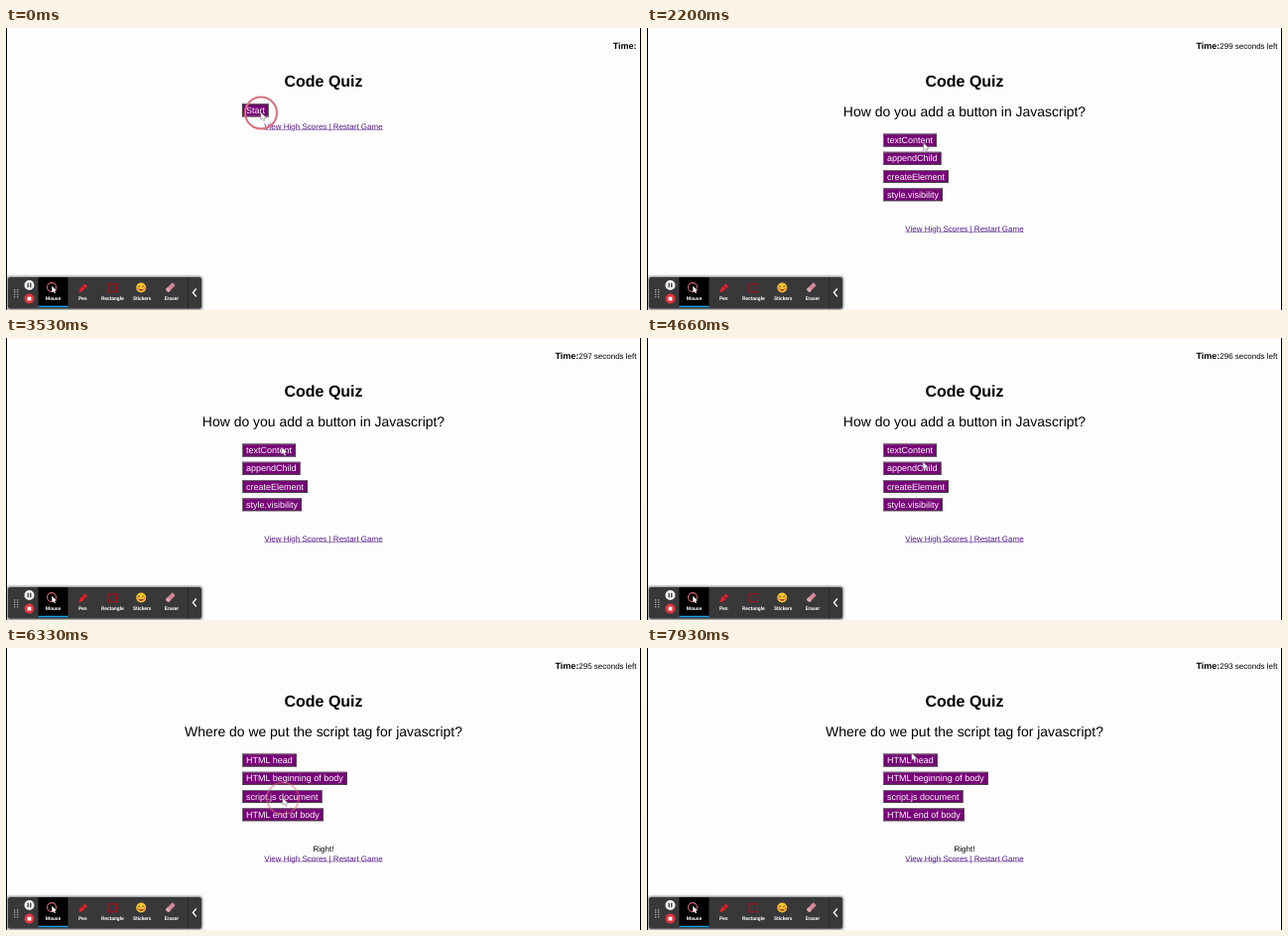
These frames come from a looping animation (640 px wide and 284 px high, 8 s). An HTML page:

```html
<!DOCTYPE html>
<html lang="en">
<head>
<meta charset="utf-8">
<title>Code Quiz</title>
<style>
@property --left { syntax: "<integer>"; inherits: true; initial-value: 299; }

html, body { margin: 0; width: 100%; height: 100%; overflow: hidden; background: #fdfdfd; }
body { font-family: "Liberation Sans", Arial, sans-serif; color: #000; }
/* laid out enlarged, then shrunk with a hair of rotation, so nothing snaps to whole pixels */
#stage {
  position: absolute; left: 0; top: 0; width: 640px; height: 284px; overflow: hidden;
  zoom: 4; transform: scale(.25) rotate(.002deg); transform-origin: 0 0;
  text-rendering: geometricPrecision;
}
#stage::after {
  content: ""; position: absolute; inset: 0;
  border: solid #000; border-width: 0 1px;
}

/* --y is the vertical centre of a line of text */
.line {
  position: absolute; left: 0; width: 640px; top: calc(var(--y) * 1px - 6px);
  text-align: center; font-size: 8px; line-height: 12px; white-space: pre;
}
.title { font-size: 16px; font-weight: bold; }
.question { font-size: 13.95px; }
.link { color: #551a8b; text-decoration: underline; text-decoration-thickness: .6px; }
.time { width: 635.5px; text-align: right; }
.time b { font-size: 9px; }
.button {
  position: absolute; left: 238px; top: calc(var(--y) * 1px);
  padding: 0 3px; font-size: 9px; line-height: 11px; white-space: pre;
  color: #fff; background: #780078;
  border: 1px solid; border-color: #6b6b6b #3c3c3c #3c3c3c #6b6b6b;
}
.pressed { border-color: #3c3c3c #6b6b6b #6b6b6b #3c3c3c; }
.count::after { counter-reset: left var(--left); content: counter(left); }

.scene, .time, .count, .cursor, .ring, .press { animation: 8s step-end infinite; }
.intro { animation-name: intro; }
.first { animation-name: first; }
.second { animation-name: second; }
.idle { animation-name: idle; }
.running { animation-name: running; }
.count { animation-name: countdown; }
.press { animation-name: press; }
.ring { animation-name: ring; animation-timing-function: linear; }
.cursor { animation-name: move; animation-timing-function: ease-in-out; }

@keyframes intro { 0% { visibility: visible } 5.75%, 100% { visibility: hidden } }
@keyframes first { 0% { visibility: hidden } 5.75% { visibility: visible } 78.75%, 100% { visibility: hidden } }
@keyframes second { 0% { visibility: hidden } 78.75%, 100% { visibility: visible } }
@keyframes idle { 0% { visibility: visible } 18.75%, 100% { visibility: hidden } }
@keyframes running { 0% { visibility: hidden } 18.75%, 100% { visibility: visible } }
@keyframes countdown {
  0% { --left: 299 } 31.25% { --left: 298 } 43.75% { --left: 297 } 56.25% { --left: 296 }
  68.75% { --left: 295 } 81.25% { --left: 294 } 93.75%, 100% { --left: 293 }
}
@keyframes press {
  0% { border-color: #6b6b6b #3c3c3c #3c3c3c #6b6b6b }
  77%, 100% { border-color: #3c3c3c #6b6b6b #6b6b6b #3c3c3c }
}
@keyframes ring {
  0%, 5% { opacity: 1 } 6%, 76.9% { opacity: 0 }
  77%, 78.75% { opacity: 1 } 79.5%, 100% { opacity: 0 }
}
@keyframes move {
  0%, 6% { transform: translate(256px, 84px) }
  13%, 16% { transform: translate(267px, 115px) }
  25%, 33% { transform: translate(278px, 115px) }
  44%, 52% { transform: translate(277px, 109px) }
  68%, 71.5% { transform: translate(278px, 156px) }
  76%, 88.5% { transform: translate(278px, 150px) }
  98.5%, 100% { transform: translate(266px, 105px) }
}

svg { position: absolute; left: 0; top: 0; }
.labels { font: bold 5px Roboto, "Open Sans", sans-serif; fill: #fff; text-anchor: middle; }
.shadow { filter: blur(1.3px); }
</style>
</head>
<body>
<div id="stage">
  <div class="line time idle" style="--y:18.2"><b>Time:</b></div>
  <div class="line time running" style="--y:18.2"><b>Time:</b><span class="count"></span> seconds left</div>
  <div class="line title" style="--y:53">Code Quiz</div>

  <div class="scene intro">
    <div class="button pressed" style="--y:76.5">Start</div>
    <div class="line" style="--y:99.2"><span class="link">View High Scores | Restart Game</span></div>
  </div>

  <div class="scene first">
    <div class="line question" style="--y:84">How do you add a button in Javascript?</div>
    <div class="button" style="--y:106.5">textContent</div>
    <div class="button" style="--y:124.75">appendChild</div>
    <div class="button press" style="--y:143">createElement</div>
    <div class="button" style="--y:161.25">style.visibility</div>
    <div class="line" style="--y:202.3"><span class="link">View High Scores | Restart Game</span></div>
  </div>

  <div class="scene second">
    <div class="line question" style="--y:84">Where do we put the script tag for javascript?</div>
    <div class="button" style="--y:106.5">HTML head</div>
    <div class="button" style="--y:124.75">HTML beginning of body</div>
    <div class="button" style="--y:143">script.js document</div>
    <div class="button" style="--y:161.25">HTML end of body</div>
    <div class="line" style="--y:202.3">Right!</div>
    <div class="line" style="--y:211.7"><span class="link">View High Scores | Restart Game</span></div>
  </div>

  <svg width="640" height="284" viewBox="0 0 640 284">
    <defs>
      <path id="arrow" d="M0 0V8.6L2 6.8L3.4 10L4.9 9.3L3.5 6.3H6.2Z"/>
    </defs>

    <!-- toolbar -->
    <rect class="shadow" x="1" y="250" width="197" height="34" rx="3" opacity=".5"/>
    <rect x="2" y="251" width="195" height="31.5" rx="2.5" fill="#38383a"/>
    <rect x="32.5" y="251" width="30" height="30.3" fill="#000"/>
    <rect x="32.5" y="279.8" width="30" height="1.5" fill="#1a9fe6"/>
    <path d="M183.5 251V282.5" stroke="#29292b"/>
    <path d="M8.7 263.3V271.5M11.7 263.3V271.5" stroke="#c4c4c4" stroke-width="1.2" stroke-dasharray="1.2 1.1"/>
    <circle cx="23.5" cy="259" r="5" fill="#f4f4f4"/>
    <path d="M22.2 256.8V261.2M24.8 256.8V261.2" stroke="#333" stroke-width="1.3"/>
    <circle cx="23.5" cy="272.6" r="5" fill="#e0343c"/>
    <rect x="21.6" y="270.7" width="3.8" height="3.8" fill="#fff"/>

    <circle cx="46" cy="261.1" r="4.5" fill="none" stroke="#cf6470" stroke-width="1.1"/>
    <use href="#arrow" transform="translate(46.3 259.8) scale(.75)" fill="#fff"/>
    <path d="M73.3 266.2L74.3 262.8L79.3 257.6L82 260.1L76.8 265.2Z" fill="#e3202a"/>
    <path d="M77 259.8L80 262.5" stroke="#7a1219" stroke-width=".9"/>
    <rect x="103" y="257.8" width="8.4" height="8" fill="none" stroke="#b00d18" stroke-width="1.1"/>
    <circle cx="136.2" cy="261.5" r="5" fill="#f9c62f"/>
    <path d="M133 260.7Q134.1 259 135.2 260.7M137.2 260.7Q138.3 259 139.4 260.7" fill="none" stroke="#4a3418" stroke-width=".8"/>
    <path d="M133.4 263H139Q136.2 267 133.4 263Z" fill="#a3412a"/>
    <circle cx="132.8" cy="262.5" r="1.1" fill="#ef7a4a"/>
    <circle cx="139.6" cy="262.5" r="1.1" fill="#ef7a4a"/>
    <g transform="translate(165.7 261.3) rotate(-45)">
      <rect x="-5" y="-2.1" width="10" height="4.2" rx=".8" fill="#d48796"/>
      <rect x="-5" y="-2.1" width="3.2" height="4.2" rx=".8" fill="#e3a5b0"/>
    </g>
    <path d="M191.8 262.5L188.4 266.5L191.8 270.5" fill="none" stroke="#fff" stroke-width="1.3"/>
    <g class="labels">
      <text x="47.5" y="274.2">Mouse</text>
      <text x="77.3" y="274.2">Pen</text>
      <text x="107.4" y="274.2">Rectangle</text>
      <text x="137.2" y="274.2">Stickers</text>
      <text x="167" y="274.2">Eraser</text>
    </g>

    <g class="cursor">
      <circle class="ring" cx="1" cy="1.5" r="16" fill="none" stroke="#d9707f" stroke-width="2"/>
      <use href="#arrow" transform="translate(.7 .7) scale(.88)" fill="#fff" stroke="#77707c" stroke-width=".6"/>
    </g>
  </svg>
</div>
</body>
</html>
```
